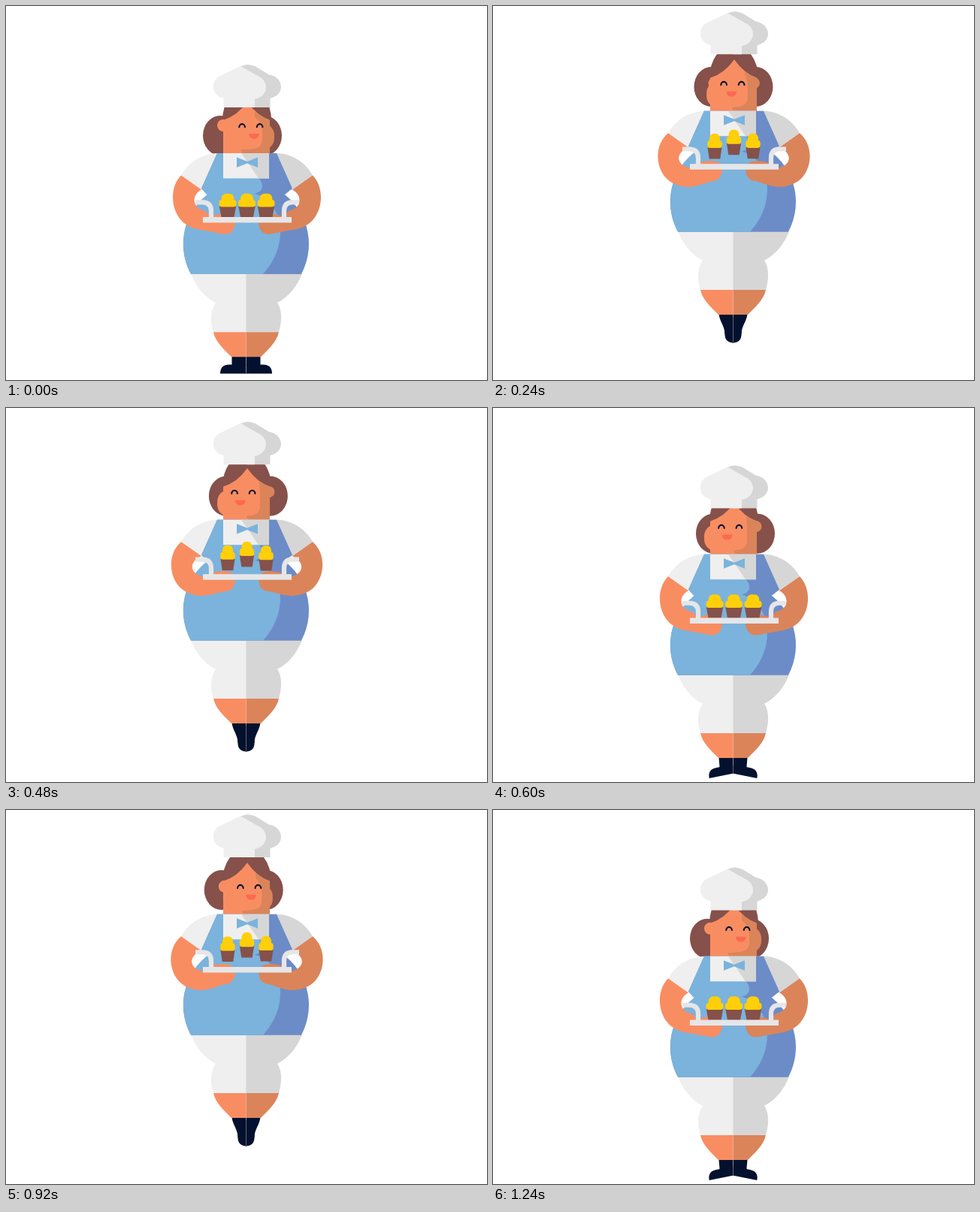
Animation, 640 px wide and 498 px high, one loop 1.28 s. Source, as an HTML page:

```html
<!DOCTYPE html>
<html lang="en">
<head>
<meta charset="utf-8">
<title>Jumping baker</title>
<style>
  html, body { margin: 0; width: 100%; height: 100%; overflow: hidden; background: #fff; }
  svg { display: block; width: 640px; height: 498px; }
  .lit { fill: #efefef; }
  .dim { fill: #d6d6d6; }
  .skin { fill: #f98d62; }
  .tan { fill: #db845a; }
  .hair { fill: #85514a; }
  .sky { fill: #7bb3dc; }
  .blue { fill: #6c8cc7; }
  .navy { fill: #03112e; }
  .cream { fill: #ffcf0a; }
  .line { fill: none; stroke: #03112e; stroke-width: 2.1; stroke-linecap: round; }
  .rail { fill: none; stroke: #e6e6e8; stroke-width: 6.2; }
</style>
</head>
<body>
<svg viewBox="0 0 640 498">
  <defs>
    <clipPath id="skirt"><path d="M230 230H410V357H230Z"/></clipPath>
    <clipPath id="face"><path id="faceShape" d="M289 197V152Q308 146 321 127.500Q334 146 351 152V197Z"/></clipPath>
    <g id="cup">
      <path class="hair" d="M-11.200 -14.300H11.200L8.500 0H-8.500Z"/>
      <rect class="cream" x="-11.500" y="-23" width="23" height="9.500" rx="4"/>
      <rect class="cream" x="-8.300" y="-31.300" width="16.600" height="14" rx="6.500"/>
    </g>
    <g id="foot">
      <path id="sock"/>
      <path id="shoe" d="M285 489.500Q285 477.500 297 477.500H319.500V489.500Z"/>
    </g>
  </defs>

  <g id="body">
    <g id="bun" class="hair">
      <ellipse cx="285" cy="172.600" rx="23" ry="26.500"/>
      <ellipse cx="344" cy="172.600" rx="23" ry="26.500"/>
    </g>
    <ellipse class="hair" cx="320.500" cy="152" rx="32.500" ry="44"/>
    <g id="ears">
      <circle class="skin" cx="289" cy="159" r="8"/>
      <circle class="tan" cx="342" cy="159" r="7.500"/>
    </g>
    <g id="cheeks">
      <rect class="skin" x="291" y="156" width="32" height="36" rx="16"/>
      <rect class="tan" x="325" y="156" width="32" height="36" rx="16"/>
    </g>
    <use href="#faceShape" class="skin"/>
    <path id="shade" class="tan" clip-path="url(#face)"/>
    <g id="eyes" class="line">
      <path d="M310.300 161.300a3.800 4.200 0 0 1 7.600 0"/>
      <path d="M333.800 161.300a3.800 4.200 0 0 1 7.600 0"/>
    </g>
    <path id="mouth" fill="#fb6a50" d="M323 170H337Q336 177 330 177T323 170Z"/>

    <use href="#foot" class="navy"/>
    <use href="#foot" class="navy" transform="matrix(-1 0 0 1 639 0)"/>
    <path class="lit" d="M246 356C252 372 263 387 279 395C272 406 271 420 276 434.300H320V356Z"/>
    <path class="dim" d="M394 356C388 372 377 387 361 395C368 406 367 420 363 434.300H319.500V356Z"/>
    <path class="skin" d="M276 434.300C279 448 290 457 300 467.300H320V434.300Z"/>
    <path class="tan" d="M363 434.300C360 448 349 457 339 467.300H319.500V434.300Z"/>
    <path id="seam" stroke="#f3e6e2" stroke-width=".7" stroke-opacity=".55"/>

    <path class="lit" d="M290 196H281C260 197 243 208 233 225.500L260 244.500H290Z"/>
    <path class="dim" d="M350 196H361C381 197 398 208 408 225.500L381 244.500H350Z"/>
    <g clip-path="url(#skirt)">
      <circle class="blue" cx="319.500" cy="317" r="83.500"/>
    </g>
    <path class="blue" d="M281 196H360L381 243L371 251H268L260 243Z"/>
    <g clip-path="url(#skirt)">
      <path class="sky" d="M319.500 233.500A83.500 83.500 0 0 0 246 357H342Q365 331 365 300C365 275 350 254 331 250Z"/>
    </g>
    <path class="sky" d="M281 196H313L336 229Q341 234 341 240Q341 247 331 250L330 252H268L260 243Z"/>
    <path class="lit" d="M289 196H350V229.500H289Z"/>
    <path class="dim" d="M313 196H350V229.500H336Z"/>
    <path class="sky" d="M307 201.500L321 207L335 201.500V215L321 209.500L307 215Z"/>
    <path id="leftArm" class="skin"/>
    <path id="rightArm" class="tan" transform="matrix(-1 0 0 1 641 0)"/>
  </g>

  <g id="top">
    <path class="dim" d="M312 80.500Q321 75.500 332 80.500L350 91.500C360 93 366 100 366 108C366 115 360 121 351.500 123V135H320V90Z"/>
    <path class="lit" d="M289.500 135V123C281 121 276 115 276 107.500C276 100 280 95 286 92.500L312 80L334 92.500C342 96 346 102 346 108C346 116 340 122 331 124V135Z"/>
    <g id="cups">
      <use href="#cup"/><use href="#cup"/><use href="#cup"/>
    </g>
    <path class="rail" d="M252 261.300H261Q273 261.300 273 273V283M390 261.300H381Q370 261.300 370 273V283"/>
    <path d="M262 281H380V288.500H262Z" fill="#e6e6e8"/>
  </g>
</svg>
<script>
  const JUMP = 640, BODY = 57.3, TOP = 72.2;
  const $ = id => document.getElementById(id);
  const cups = [...$('cups').children];
  const set = (id, name, value) => $(id).setAttribute(name, value);
  const move = (id, x, y = 0) => set(id, 'transform', `translate(${x} ${y})`);
  const mix = (a, b, k) => a + (b - a) * k;

  // Height of the jump, 0 on the floor to 1 at the top.
  const height = t => Math.max(0, 1 - Math.pow(Math.abs(t - JUMP / 2) / 283, 3.1));
  const turning = x => 1 - Math.exp(-7 * Math.pow(x, 1.85));

  // Lift of a cake above the tray: start, duration, height, sharpness.
  const lift = (t, [start, span, high, power]) => {
    const x = (t - start) / span;
    return x <= 0 || x >= 1 ? 0 : high * Math.pow(Math.sin(Math.PI * x), power);
  };
  const EARLY = [20, 540, 7, 0.5], MID = [40, 560, 12.5, 0.5], LATE = [70, 530, 7.8, 1];

  // The elbow follows the body, the hand follows the tray.
  function armPath(p) {
    const hand = (BODY - TOP) * p, out = -3 * p;
    return `M233 225.500C${218.5 + out} 240 ${218.5 + out} 268 ${232 + out} 284
      C${240 + out} 294 252 297.500 ${265 + out} ${299 + hand * .13}
      Q276 ${301 + hand * .4} 290 ${304 + hand}Q305 ${304 + hand} 305 ${286 + hand}
      C304 ${280 + hand} 298 ${277 + hand} 288 ${277 + hand}
      Q280 ${277 + hand} 272 ${280 + hand}L264 272
      C${249 + out * 1.5} 270 ${245 + out * 1.5} 253 260 244.500Z`;
  }

  function draw(now) {
    const time = now % (2 * JUMP), t = time % JUMP, first = time < JUMP;
    const p = height(t), g = turning(t / JUMP), turn = first ? g : 1 - g;

    move('body', 0, -BODY * p);
    move('top', 0, -TOP * p);

    move('bun', 8 * turn, -9 * p - 4 * turn * (1 - p));
    move('ears', 8 * turn);
    move('cheeks', -10 * turn);
    move('eyes', -10.2 * turn);
    move('mouth', -18.5 * turn);
    const up = mix(331, 337, turn), low = mix(341, 338, turn), neck = mix(312, 320, turn);
    set('shade', 'd', `M${up} 120V148Q${low} 156 ${low} 166V177
      Q${low} 190 ${low - 15} 190.500L${neck} 191.500L${neck + 3} 197H360V120Z`);

    const arm = armPath(p);
    set('leftArm', 'd', arm);
    set('rightArm', 'd', arm);

    // Toes point down soon after take-off.
    const point = Math.min(1, p / 0.17);
    set('shoe', 'transform', `translate(${.4 * point} ${2.3 * point}) rotate(${-90 * point} 309 478.5)`);
    set('sock', 'd', `M300.500 466.500C${300.5 + point} ${470 + 6 * point} ${300.5 + 8 * point} ${474 + 9 * point}
      ${300.5 + 8 * point} ${479 + 14 * point}H319.500V466.500Z`);
    set('seam', 'd', `M319.500 434.300V${488 + 16 * point}`);

    const paths = first ? [LATE, MID, EARLY] : [EARLY, MID, LATE];
    cups.forEach((cup, i) => {
      const y = lift(t, paths[i]), s = Math.min(1, y / 2.5);
      cup.setAttribute('transform',
        `translate(${295 + 25.5 * i} ${281 - y}) scale(${1 - .15 * s} ${1 + .07 * s})`);
    });
  }

  const start = performance.now();
  function tick() {
    draw(performance.now() - start);
    requestAnimationFrame(tick);
  }
  tick();
</script>
</body>
</html>
```
